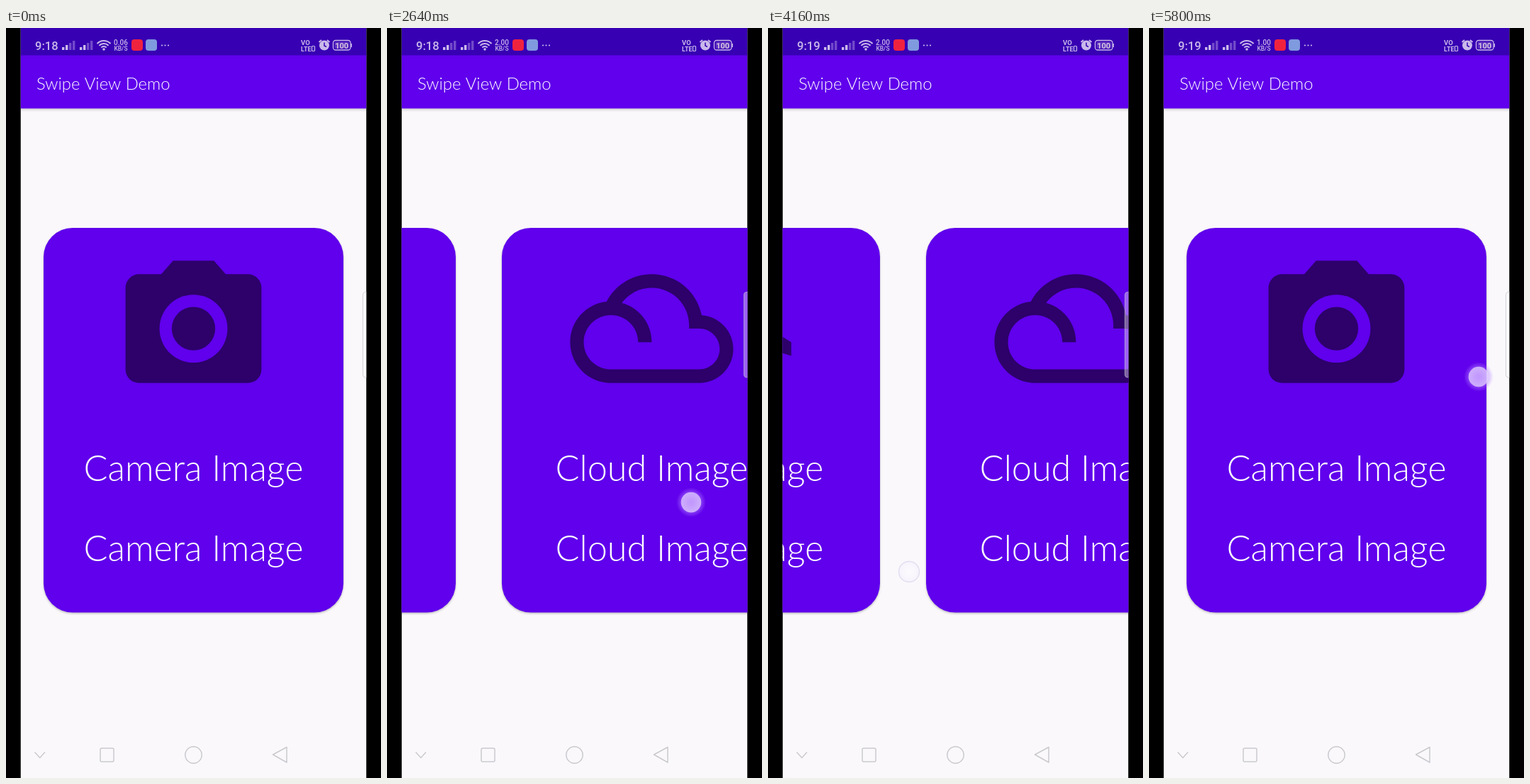
An HTML page with a canvas that plays this animation: 529x1058 px, repeating every 5.84 s.

```html
<!DOCTYPE html>
<html lang="en">
<head>
<meta charset="utf-8">
<title>Swipe View Demo</title>
<style>
html, body { margin: 0; width: 100%; height: 100%; overflow: hidden; background: #000; }
canvas { display: block; }
</style>
</head>
<body>
<canvas id="stage" width="529" height="1058"></canvas>
<script>
const ctx = document.getElementById('stage').getContext('2d');
const LOOP = 5840, STEP = 40, PAGE = 488, SLOP = 12, FADE = 200;
const LEFT = 20.5, RIGHT = 508.5;
const PURPLE = '#6000ec', DARK = '#2d006a', PAPER = '#faf8fb', STATUS = '#c9b9ea';
const LIGHT = 'Lato, "Lato Light", sans-serif';

// Touch down, release, settled; start x, y; end x, y; from page, to page.
const swipes = [
  [1400, 1520, 1760, 338, 710, 130, 735, 0, 1],
  [1960, 2120, 2360, 400, 700, 150, 740, 1, 2],
  [2480, 2680, 2880, 308, 680, 497, 663, 2, 1],
  [3040, 3200, 3380, 101, 700, 457, 678, 1, 0],
  [3640, 3760, 3960, 390, 720, 170, 765, 0, 1],
  [4000, 4080, 4440, 418, 730, 199, 767, 1, 2],
  [4800, 4960, 5160, 105, 690, 464, 666, 2, 1],
  [5200, 5360, 5560, 120, 600, 465, 560, 1, 0],
  [5600, 5800, 5840, 200, 560, 465, 492, 0, 0]
].map(([down, up, end, x0, y0, x1, y1, from, to]) => ({ down, up, end, x0, y0, x1, y1, from, to }));

const flightPath = new Path2D('M21 16v-2l-8-5V3.5c0-.83-.67-1.5-1.5-1.5S10 2.67 10 3.5V9l-8 5v2l8-2.5V19l-2 1.5V22l3.5-1 3.5 1v-1.5L13 19v-5.5z');
const cloudPath = new Path2D('M19.35 10.04C18.67 6.59 15.64 4 12 4 9.11 4 6.61 5.64 5.36 8.04 2.35 8.36 0 10.9 0 14c0 3.31 2.69 6 6 6h13c2.76 0 5-2.24 5-5 0-2.64-2.05-4.78-4.65-4.96z' +
  'M19 18H6c-2.21 0-4-1.79-4-4s1.79-4 4-4 4 1.79 4 4h2c0-2.76-1.86-5.08-4.4-5.78C8.61 6.88 10.2 6 12 6c3.03 0 5.5 2.47 5.5 5.5v.5H19c1.65 0 3 1.35 3 3s-1.35 3-3 3z');

const pages = [
  { label: 'Camera Image', icon: drawCamera },
  { label: 'Flight Image', icon: () => ctx.fill(flightPath) },
  { label: 'Cloud Image', icon: () => ctx.fill(cloudPath, 'evenodd') }
];

const clamp = v => Math.max(0, Math.min(1, v));
const mix = (a, b, u) => a + (b - a) * u;

function rect(x, y, w, h, color) {
  ctx.fillStyle = color;
  ctx.fillRect(x, y, w, h);
}

function round(x, y, w, h, r, fill, stroke) {
  ctx.beginPath();
  ctx.roundRect(x, y, w, h, r);
  paint(fill, stroke);
}

function circle(x, y, r, fill, stroke) {
  ctx.beginPath();
  ctx.arc(x, y, r, 0, Math.PI * 2);
  paint(fill, stroke);
}

function line(points, close, fill, stroke) {
  ctx.beginPath();
  points.forEach(([x, y]) => ctx.lineTo(x, y));
  if (close) ctx.closePath();
  paint(fill, stroke);
}

function paint(fill, stroke) {
  if (fill) { ctx.fillStyle = fill; ctx.fill(); }
  if (stroke) { ctx.strokeStyle = stroke; ctx.stroke(); }
}

function text(str, x, y, font, color, align = 'left') {
  ctx.font = font;
  ctx.fillStyle = color;
  ctx.textAlign = align;
  ctx.fillText(str, x, y);
}

function radial(x, y, r0, r1, inner, outer) {
  const g = ctx.createRadialGradient(x, y, r0, x, y, r1);
  g.addColorStop(0, inner);
  g.addColorStop(1, outer);
  return g;
}

function shadow(blur, dy, color) {
  ctx.shadowBlur = blur;
  ctx.shadowOffsetY = dy;
  ctx.shadowColor = color;
}

function drawCamera() {
  round(2, 4, 20, 16, 2, DARK);
  line([[7.17, 4.1], [9, 2], [15, 2], [16.83, 4.1]], true, DARK);
  circle(12, 12, 5, PURPLE);
  circle(12, 12, 3.2, DARK);
}

function drawCard({ label, icon }, dx) {
  ctx.save();
  ctx.translate(dx, 0);
  ctx.save();
  shadow(3, 1.5, 'rgba(0,0,0,.25)');
  round(53, 282, 423, 542.5, 41, PURPLE);
  ctx.restore();
  ctx.save();
  ctx.translate(149.4, 309);
  ctx.scale(9.59, 9.59);
  ctx.fillStyle = DARK;
  icon();
  ctx.restore();
  for (const y of [639, 752]) text(label, 264.5, y, '300 50.4px ' + LIGHT, '#fff', 'center');
  ctx.restore();
}

function drawSignal(x) {
  [4, 7, 10, 13].forEach((h, i) => rect(x + i * 5, 31 - h, 3.4, h, i < 2 ? STATUS : 'rgba(201,185,234,.4)'));
}

function drawWifi(x, y) {
  ctx.lineWidth = 2;
  for (const r of [5, 9, 13]) {
    ctx.beginPath();
    ctx.arc(x, y, r, -Math.PI * .76, -Math.PI * .24);
    paint(null, STATUS);
  }
  circle(x, y - 1, 1.8, STATUS);
}

function drawStatus(t) {
  rect(LEFT, 0, PAGE, 38.5, '#3700b3');
  text(t < 3040 ? '9:18' : '9:19', 41, 31, '500 16.5px Roboto, sans-serif', STATUS);
  drawSignal(79);
  drawSignal(104);
  drawWifi(138, 31);
  const rate = t < 960 ? '0.06' : t < 4400 ? '2.00' : '1.00';
  text(rate, 162, 24, '500 10px Roboto, sans-serif', STATUS, 'center');
  text('KB/S', 162, 31.5, '500 8.5px Roboto, sans-serif', STATUS, 'center');
  round(177, 16, 16, 16, 4, '#f0233f');
  round(197, 16, 16, 16, 4, '#7f9ade');
  for (const x of [220, 224.5, 229]) circle(x, 24.5, 1.1, STATUS);
  text('VO', 416, 24, '700 9.5px Roboto, sans-serif', STATUS);
  text('LTE', 416, 33, '700 9px Roboto, sans-serif', STATUS);
  ctx.lineWidth = 1.2;
  round(431.5, 25.5, 4, 7, 1, null, STATUS);
  circle(449, 24.5, 7, STATUS);
  ctx.lineWidth = 2;
  line([[441.5, 20], [445, 17]], false, null, STATUS);
  line([[456.5, 20], [453, 17]], false, null, STATUS);
  ctx.lineWidth = 1.5;
  line([[449, 20.5], [449, 25], [452, 26.5]], false, null, '#3700b3');
  ctx.lineWidth = 1.3;
  round(461.5, 17.5, 24.5, 13.5, 3.5, null, STATUS);
  round(463.5, 19.5, 20.5, 9.5, 2, 'rgba(201,185,234,.25)');
  rect(486.5, 22, 1.5, 5, STATUS);
  text('100', 473.7, 28.5, '700 11px Roboto, sans-serif', '#d6c8df', 'center');
}

function drawToolbar() {
  ctx.save();
  shadow(4, 1, 'rgba(0,0,0,.22)');
  rect(LEFT, 38, PAGE, 75.5, PURPLE);
  ctx.restore();
  text('Swipe View Demo', 43, 87, '300 23.8px ' + LIGHT, '#fff');
}

function drawNav() {
  const grey = '#cacace';
  ctx.lineWidth = 1.5;
  line([[40.5, 1021.5], [47.8, 1029.5], [55, 1021.5]], false, null, grey);
  round(133, 1016, 19, 19, 2, null, grey);
  circle(264.5, 1025.5, 11.7, null, grey);
  ctx.lineJoin = 'round';
  line([[376.5, 1025], [396, 1014.5], [396, 1036]], true, null, grey);
  ctx.lineJoin = 'miter';
}

function drawHandle() {
  ctx.lineWidth = 1.2;
  round(503.5, 372.5, 12, 120.5, 4, 'rgba(255,255,255,.38)', 'rgba(190,190,196,.6)');
}

function fingerAt(s, t) {
  const u = clamp((t - s.down) / (s.up - s.down)) ** 2;
  return { x: mix(s.x0, s.x1, u), y: mix(s.y0, s.y1, u) };
}

function scrollAt(s, t) {
  if (!s || s.from === s.to) return 0;
  const dx = fingerAt(s, t).x - s.x0;
  const dragged = s.from * PAGE - Math.sign(dx) * Math.max(0, Math.abs(dx) - SLOP);
  const u = clamp((t - s.up) / (s.end - s.up));
  return mix(dragged, s.to * PAGE, 1 - (1 - u) ** 2);
}

function drawFinger(s, t) {
  const alpha = 1 - clamp((t - s.up) / FADE);
  if (!alpha) return;
  const { x, y } = fingerAt(s, t);
  ctx.save();
  ctx.globalAlpha = alpha;
  if (t <= s.up) {
    circle(x, y, 21, radial(x, y, 12, 21, 'rgba(180,130,255,.6)', 'rgba(180,130,255,0)'));
    circle(x, y, 14.3, radial(x, y, 2, 14.3, 'rgba(214,184,255,.7)', 'rgba(232,218,255,.7)'));
  } else {
    ctx.lineWidth = 1.5;
    circle(x, y, 14.5, radial(x, y, 0, 14.5, 'rgba(255,255,255,.65)', 'rgba(244,236,255,.75)'), 'rgba(196,188,222,.7)');
  }
  ctx.restore();
}

function draw(t) {
  const swipe = swipes.filter(s => s.down <= t).pop();
  const scroll = scrollAt(swipe, t);
  rect(0, 0, 529, 1058, '#000');
  ctx.save();
  ctx.beginPath();
  ctx.rect(LEFT, 0, RIGHT - LEFT, 1058);
  ctx.clip();
  rect(LEFT, 0, PAGE, 1058, PAPER);
  pages.forEach((page, i) => {
    const dx = i * PAGE - scroll;
    if (Math.abs(dx) < PAGE) drawCard(page, dx);
  });
  drawToolbar();
  drawStatus(t);
  drawNav();
  drawHandle();
  if (swipe) drawFinger(swipe, t);
  ctx.restore();
}

function tick() {
  const t = performance.now() % LOOP;
  draw(Math.floor(t / STEP) * STEP);
  requestAnimationFrame(tick);
}
tick();
</script>
</body>
</html>
```
